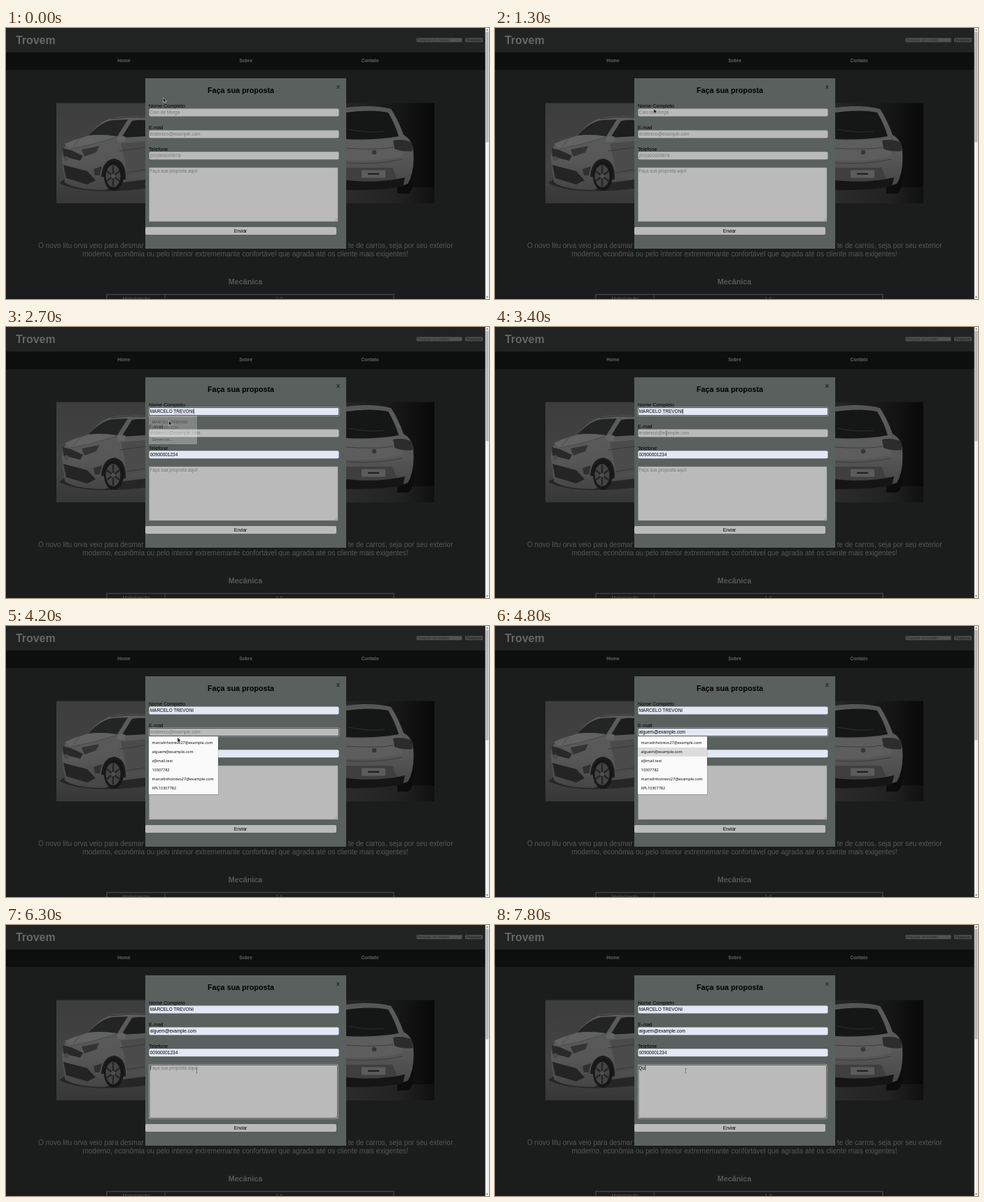
These frames come from a looping animation (690x388 px, 8 s). An HTML page:

```html
<!DOCTYPE html>
<html lang="pt-BR">
<head>
<meta charset="utf-8">
<title>Faça sua proposta</title>
<style>
html, body { margin: 0; width: 100%; height: 100%; overflow: hidden; background: #1b1d1c; }
svg { display: block; width: 690px; height: 388px; font-family: "Liberation Sans", Arial, sans-serif; }
.menu text { font-family: "Noto Sans", "Open Sans", sans-serif; }
</style>
</head>
<body>
<svg id="stage" viewBox="0 0 690 388"></svg>
<script>
const LOOP = 8000, STEP = 100;
const NAME = "MARCELO TREVONI", PHONE = "00900001234";
const EMAILS = ["marcelnhotrevo27@example.com", "alguem@example.com", "z@mail.test",
  "10307782", "marcelinhotrevo27@example.com", "XPL10307782"];

const rect = (x, y, w, h, fill, more = "") =>
  `<rect x="${x}" y="${y}" width="${w}" height="${h}" fill="${fill}" ${more}/>`;
const path = (d, fill, more = "") => `<path d="${d}" fill="${fill}" ${more}/>`;
const circle = (x, y, r, fill) => `<circle cx="${x}" cy="${y}" r="${r}" fill="${fill}"/>`;
const ellipse = (x, y, rx, ry, fill) => `<ellipse cx="${x}" cy="${y}" rx="${rx}" ry="${ry}" fill="${fill}"/>`;
const stroke = (color, width) => ` stroke="${color}" stroke-width="${width}" `;
const line = (d, color, width) => path(d, "none", stroke(color, width));
const MID = ' text-anchor="middle" ', END = ' text-anchor="end" ', BOLD = ' font-weight="700" ';

// y is the middle of the capitals
const text = (x, y, size, fill, str, more = "") =>
  `<text x="${x}" y="${y + size * 0.36}" font-size="${size}" fill="${fill}" ${more}>${str}</text>`;

function header() {
  const link = (x, str) => text(x, 47, 6.6, "#636564", str, MID + BOLD);
  return rect(0, 0, 685, 35, "#212322") + rect(0, 35, 685, 25, "#0d0e0e") +
    text(14, 17.5, 15.9, "#656766", "Trovem", BOLD) +
    link(168.5, "Home") + link(342.5, "Sobre") + link(520, "Contato") +
    rect(586.5, 14.3, 65, 6, "#505251", 'rx="1.2"') +
    text(588, 17.2, 4.8, "#262827", "Pesquise um modelo") +
    rect(656, 14.3, 25, 6, "#4d4f4e", 'rx="1.2"') +
    text(668.5, 17.2, 4.8, "#161616", "Pesquisar", MID);
}

function frontPhoto() {
  return rect(72, 107.5, 127, 143.5, "url(#studio)") +
    path("M76 222Q110 240 199 230V214L90 212Z", "#262626") +
    path("M80 187Q80 166 96 161L118 154Q133 134 151 129Q172 125 199 127V217L168 221L141 232Q100 232 84 221Z", "url(#paint)") +
    path("M117 155Q134 135 152 132L174 131L159 155Q135 151 117 155Z", "#232424") +
    path("M165 157L180 133Q190 131 199 132V155Z", "#1c1d1d") +
    line("M150 130Q175 126 199 128", "#2d2d2d", 1) +
    path("M84 166L96 161L118 154Q137 151 158 156L121 167L92 173Z", "#626262") +
    line("M92 173L121 167L160 156M105 159L96 170", "#444", 0.8) +
    path("M81 172L93 175L110 183L106 190L82 184Z", "#292929") +
    path("M108 174L133 169L129 178L112 184Z", "#343434") +
    path("M82 196L116 205L128 218L116 224L86 215Z", "#242424") +
    path("M125 202L137 198L134 211L127 211Z", "#303030") +
    path("M164 165L199 162V207L174 211Z", "#4b4b4b") +
    line("M162 176L199 171M172 207L199 203", "#383838", 1) +
    path("M158 157Q163 152 171 156L170 163L160 163Z", "#646464") +
    path("M136 213Q138 188 155 187Q172 190 171 217Z", "#1b1b1b") +
    ellipse(154, 212, 14, 21, "#171717") + ellipse(153, 212, 10.5, 16, "#444") +
    line("M153 197V227M144 205L162 219M162 205L144 219", "#252525", 2.4) +
    circle(153, 212, 3, "#505050") + circle(86, 187, 3.4, "#4a4a4a");
}

function rearPhoto() {
  return rect(486, 107.5, 126, 143.5, "url(#night)") +
    rect(486, 228, 126, 23, "url(#floor)") +
    path("M560 203L582 197Q585 229 575 237H559Z", "#0c0c0c") +
    path("M486 114Q524 109 550 116Q560 131 568 153Q581 160 582 177Q584 207 574 223Q550 232 486 231Z", "url(#paint)") +
    path("M486 121Q524 116 546 121Q556 138 561 155Q530 161 486 159Z", "#151616") +
    path("M486 115Q524 110 549 117L551 121Q520 115 486 119Z", "#555") +
    path("M486 160Q530 163 565 157L567 183Q533 192 486 190Z", "#5d5d5d") +
    line("M486 193Q530 196 566 188M486 172Q530 175 553 171", "#3c3c3c", 1) +
    path("M553 161Q567 158 580 164L581 176Q567 178 555 173Z", "#2c2c2c") +
    path("M486 200H552L560 219Q535 226 486 225Z", "#3f3f3f") +
    path("M486 218Q530 223 570 214L567 227Q530 233 486 232Z", "#151515") +
    rect(508, 203.5, 34, 11, "#5c5c5c", 'rx="1"') + rect(517, 207.7, 16, 2.4, "#222") +
    circle(526, 178, 3.2, "#363636") +
    line("M489 145Q520 151 541 148", "#2c2c2c", 1.2);
}

function page() {
  const grey = "#555857";
  return rect(0, 0, 690, 388, "#1b1d1c") + header() + frontPhoto() + rearPhoto() +
    text(46, 311, 10.06, grey, "O novo litu orva veio para desmar") +
    text(638.5, 311, 10.06, grey, "te de carros, seja por seu exterior", END) +
    text(342, 323, 10.06, grey, "moderno, econômia ou pelo interior extrememante confortável que agrada até os cliente mais exigentes!", MID) +
    text(342, 363.5, 10.75, grey, "Mecânica", MID + BOLD) +
    rect(144, 381.5, 410, 10, "none", stroke("#434544", 1.4)) +
    rect(226.5, 382, 1.2, 6, "#434544") +
    text(186, 387, 7.2, grey, "Motorização", MID) + text(390.5, 387, 7.2, grey, "1.0", MID) +
    rect(684.7, 0, 5.3, 388, "#f0f0f0") + rect(685.3, 5.5, 4.1, 158, "#b8b8b8") +
    path("M685.8 3.6L687.4 1.8L689 3.6ZM685.8 384.4L687.4 386.2L689 384.4Z", "#555");
}

function ring(x, y, w, h) {
  return rect(x - 0.7, y - 0.7, w + 1.4, h + 1.4, "none", 'rx="2" opacity=".7"' + stroke("#e8e8e8", 0.7)) +
    rect(x, y, w, h, "none", 'rx="1.6" opacity=".75"' + stroke("#101010", 0.7));
}

function caret(str, y) {
  ruler.textContent = str;
  return rect(205.9 + ruler.getComputedTextLength(), y - 3.7, 0.6, 7.4, "#000");
}

function field(label, y, hint, value, focused, chosen) {
  return text(204, y - 9.7, 7.2, "#000", label) +
    rect(204.5, y - 5.5, 271, 11, value ? "#e3e8f6" : "#bababa", 'rx="2"') +
    (focused ? ring(204.5, y - 5.5, 271, 11) : "") +
    text(205.7, y, 6.47, value ? "#000" : "#777", value || hint) +
    (focused && chosen ? caret(value, y) : "");
}

function misspelt(x, w, y) {
  return path(`M${x} ${y}h${w}`, "none", stroke("#b05a68", 0.6) + 'stroke-dasharray="1 0.7"');
}

function form(t) {
  const name = t >= 2400 ? NAME : "";
  const email = t >= 4800 ? EMAILS[1] : t >= 4400 ? EMAILS[0] : "";
  const onName = t >= 1500 && t < 3600, onEmail = t >= 3600 && t < 6300, onText = t >= 6300;
  const nameChosen = t >= 2600, emailChosen = t >= 5300;
  const message = t >= 7800 ? "Qu" : t >= 7500 ? "Q" : "";
  return rect(199, 72, 287, 244, "#59605d") +
    text(335.5, 89.5, 10.75, "#000", "Faça sua proposta", MID + BOLD) +
    text(474.5, 84.5, 7.2, "#000", "X", MID) +
    field("Nome Completo", 121, "Caio de Morga", name, onName, nameChosen) +
    field("E-mail", 152, "endereco@example.com", email, onEmail, emailChosen) +
    field("Telefone", 182.7, "(00)900005678", t >= 2400 ? PHONE : "") +
    (onName && nameChosen ? misspelt(239, 28, 124.4) : "") +
    (onEmail && emailChosen ? misspelt(206, 24, 155.4) : "") +
    rect(204.5, 200, 269.5, 77, "#bababa", onText ? "" : stroke("#8c8f8e", 0.5)) +
    line("M470 276L473 273M472 276L473 275", "#777", 0.5) +
    (onText ? ring(205, 200.5, 268.5, 76) : "") +
    text(205.3, 204.5, 6.4, message ? "#000" : "#777", message || "Faça sua proposta aqui!") +
    (onText ? caret(message, 204.5) : "") +
    rect(199, 285, 273, 11, "#bababa", 'rx="2"') +
    text(335, 290.3, 6.47, "#000", "Enviar", MID);
}

// Opaque until chosen, then a short fade
function menu(t, opens, chosen, x, y, w, h, content) {
  const alpha = t < opens ? 0 : Math.min(1, 1 - (t - chosen) / 215);
  if (alpha <= 0) return "";
  return `<g class="menu" opacity="${alpha}">` +
    rect(x + 0.5, y + 0.7, w, h, "#000", 'opacity=".25" rx="1"') +
    rect(x, y, w, h, "#fafafa", 'rx="1"') + content + "</g>";
}

function nameMenu(t) {
  return menu(t, 1600, 2550, 204, 127, 69, 41,
    (t >= 2400 ? rect(204, 130, 69, 20, "#dcdcdc") : "") +
    text(208.5, 136, 5.6, "#111", NAME, 'font-weight="500"') +
    text(208.5, 144.5, 5, "#333", "(00) 90000-1234") +
    text(208.5, 161, 5.6, "#222", "Gerenciar..."));
}

function emailMenu(t) {
  const hover = t >= 4800 ? 1 : t >= 4400 ? 0 : -1;
  return menu(t, 3700, 5345, 204, 158, 99, 83,
    (hover >= 0 ? rect(204, 161 + hover * 12.9, 99, 12.9, "#dcdcdc") : "") +
    EMAILS.map((mail, i) => text(208.5, 167.3 + i * 12.9, 5.5, "#111", mail, 'font-weight="500"')).join(""));
}

// time, x, y
const TRACK = [[0, 224.5, 99.5], [900, 224.5, 99.5], [1500, 227.5, 121], [2000, 227.5, 121],
  [2200, 227.5, 124], [2500, 232.5, 134], [2800, 232.5, 134], [3400, 245, 152], [4000, 245, 152],
  [4200, 245, 159.5], [4500, 245, 165], [5500, 245, 165], [6200, 272.5, 208.7], [LOOP, 272.5, 208.7]];

function pointerAt(t) {
  const i = TRACK.findIndex(p => p[0] > t);
  const [t0, x0, y0] = TRACK[i - 1], [t1, x1, y1] = TRACK[i];
  const k = (t - t0) / (t1 - t0), e = k * k * (3 - 2 * k);
  return [x0 + (x1 - x0) * e, y0 + (y1 - y0) * e];
}

function pointer(t) {
  // hidden while the list is driven from the keyboard
  if (t >= 4800 && t < 5500) return "";
  const [x, y] = pointerAt(t);
  const overMenu = (t >= 2100 && t < 2800) || (t >= 4100 && t < 5600);
  const overField = [121, 152, 182.7].some(c => Math.abs(y - c) < 5.5) || y > 200;
  const shape = overField && !overMenu
    ? line("M-1 -3.2H1M0 -3.2V3.2M-1 3.2H1", "#555", 0.6)
    : path("M0 0V7L1.7 5.5L2.8 8L4 7.4L2.9 5.1H5Z", "#111", stroke("#ddd", 0.6));
  return `<g transform="translate(${x} ${y})">${shape}</g>`;
}

const gradient = (id, dir, ...stops) => `<linearGradient id="${id}" ${dir}>` +
  stops.map(([at, color]) => `<stop offset="${at}" stop-color="${color}"/>`).join("") + "</linearGradient>";
const DOWN = 'x2="0" y2="1"';

const stage = document.getElementById("stage");
stage.innerHTML = "<defs>" +
  gradient("studio", DOWN, [0, "#3d3d3d"], [0.65, "#444"], [1, "#373737"]) +
  gradient("paint", DOWN, [0, "#5c5c5c"], [0.6, "#575757"], [1, "#454545"]) +
  gradient("night", "", [0, "#262626"], [0.6, "#161616"], [1, "#080808"]) +
  gradient("floor", "", [0, "#2b2b2b"], [0.6, "#222"], [1, "#101010"]) +
  `</defs>${page()}<text id="ruler" font-size="6.47" visibility="hidden"></text><g id="live"></g>`;
const live = document.getElementById("live"), ruler = document.getElementById("ruler");

let shown = -1;
function draw(now) {
  const t = Math.floor((now % LOOP) / STEP) * STEP;
  if (t !== shown) {
    shown = t;
    live.innerHTML = form(t) + nameMenu(t) + emailMenu(t) + pointer(t);
  }
}

let start;
function tick(now) {
  start ??= now;
  draw(now - start);
  requestAnimationFrame(tick);
}
draw(0);
requestAnimationFrame(tick);
</script>
</body>
</html>
```
